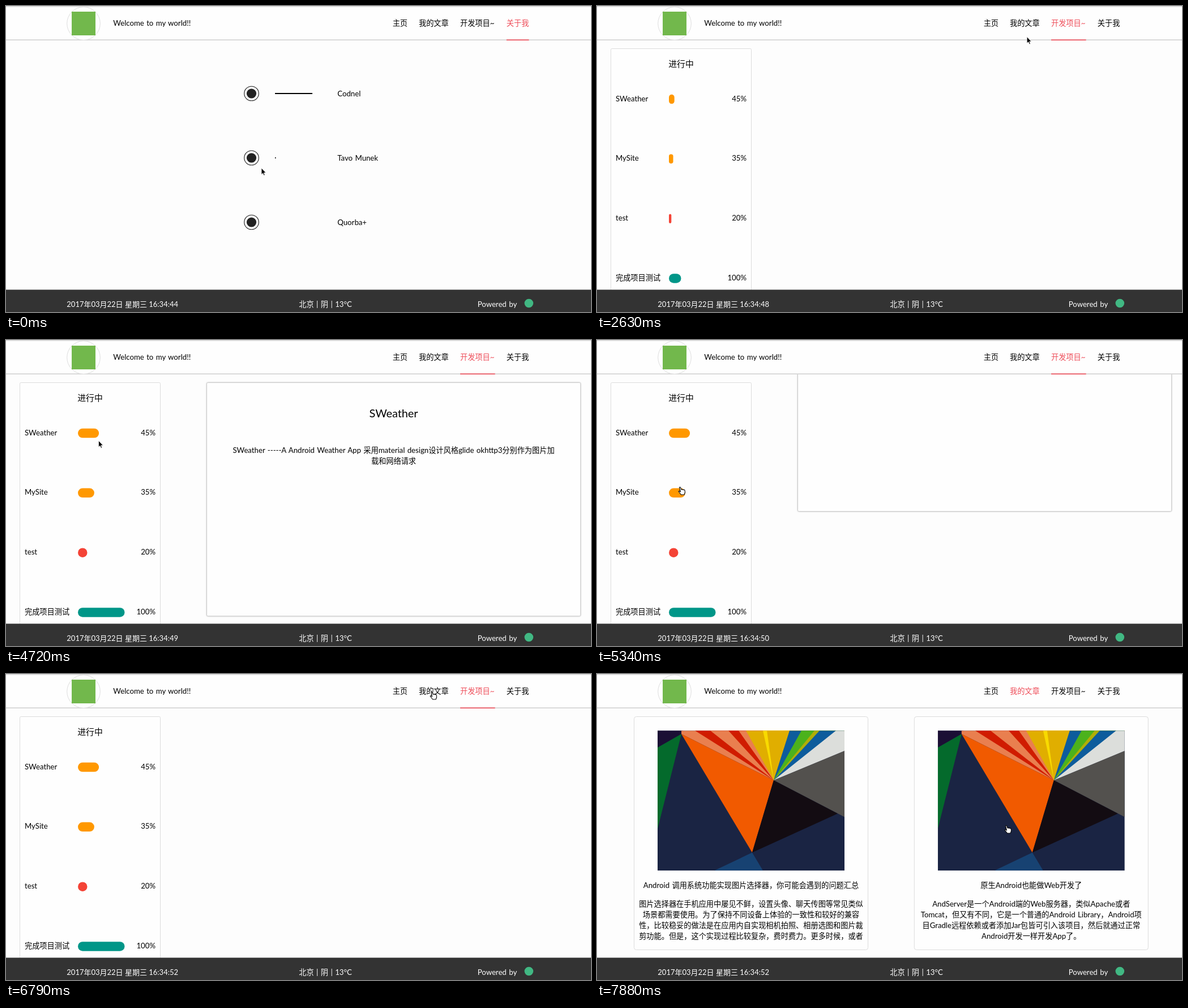
These frames come from a looping animation (1033 px wide and 542 px high, 8000 ms). An HTML page:

```html
<!DOCTYPE html>
<html lang="zh-CN">
<head>
<meta charset="utf-8">
<title>My world</title>
<style>
html, body { margin: 0; width: 100%; height: 100%; overflow: hidden; background: #fdfdfd; }
svg { display: block; width: 1033px; height: 542px; }
text { font: 13.2px Lato, "Noto Sans CJK SC", "Noto Sans CJK", sans-serif; word-spacing: .08em; fill: #000; }
.mid { text-anchor: middle; }
.end { text-anchor: end; }
.big { font-size: 19.8px; }
.head { font-size: 14.85px; }
.foot text { fill: #fff; }
#clock { font-size: 13px; word-spacing: 0; }
.card { fill: #fefefe; stroke: #dcdcdc; }
#detail rect { fill: #fefefe; stroke: #ccc; filter: drop-shadow(0 0 1px rgba(0,0,0,.25)); }
</style>
</head>
<body>
<svg viewBox="0 0 1033 542">
  <defs>
    <clipPath id="frame"><rect width="330" height="248"/></clipPath>
    <g id="art" clip-path="url(#frame)">
      <rect width="330" height="248" fill="#1a2443"/>
      <path d="M0 0H45L42 6 0 30z" fill="#1b0f35"/>
      <path d="M0 30L42 6 0 174z" fill="#046a2c"/>
      <g id="fan"></g>
      <path d="M42 6L205 88 167 216z" fill="#f15a00"/>
      <path d="M315 0H330V36L205 88z" fill="#dcdedb"/>
      <path d="M330 36V153L205 88z" fill="#53514e"/>
      <path d="M205 88L318 147 167 216z" fill="#130c12"/>
      <path d="M167 216L100 248H186z" fill="#174272"/>
    </g>
  </defs>
  <rect width="1033" height="542" fill="#fdfdfd"/>

  <g id="about"></g>

  <g id="projects">
    <rect class="card" x="24.5" y="75.5" width="248" height="460" rx="2"/>
    <text class="head mid" x="148.5" y="108">进行中</text>
    <g id="rows"></g>
    <g id="detail">
      <rect x="354.5" y="75.5" width="660" height="413.5" rx="2"/>
      <g id="weather">
        <text class="big mid" x="684.5" y="137">SWeather</text>
        <text class="mid" x="684.5" y="200">SWeather -----A Android Weather App 采用material design设计风格glide okhttp3分别作为图片加</text>
        <text class="mid" x="684.5" y="219">载和网络请求</text>
      </g>
      <g id="site">
        <text class="big mid" x="684.5" y="137">MySite</text>
        <text class="mid" x="684.5" y="200">原先的老项目重新开坑重构：推掉angular用vue.js重构</text>
      </g>
    </g>
  </g>

  <g id="articles"></g>

  <g>
    <rect width="1033" height="60" fill="#fefefe"/>
    <rect y=".2" width="1033" height="1.3" fill="#cfcfcf"/>
    <rect y="59.2" width="1033" height="1.8" fill="#d6d6d6"/>
    <circle cx="137" cy="31" r="29.3" fill="#fff" stroke="#ddd"/>
    <rect x="116" y="10" width="42" height="42" fill="#72b84c"/>
    <text x="189.3" y="35">Welcome to my world!!</text>
    <g id="nav"></g>
  </g>

  <g class="foot">
    <rect y="502.5" width="1033" height="40" fill="#333"/>
    <text id="clock" x="107.3" y="533"></text>
    <text class="mid" x="564" y="533">北京 | 阴 | 13°C</text>
    <text x="832.7" y="532.5">Powered by</text>
    <circle cx="923.3" cy="526.5" r="7.8" fill="#41b883"/>
  </g>

  <g id="cursor" stroke-linejoin="round">
    <path id="arrow" d="M0 0V11.6L2.6 9.2 4.4 13.2 6.2 12.4 4.5 8.5H8z" fill="#000" stroke="#fff" stroke-width=".8"/>
    <path id="hand" d="M-4.5-6q1.5-1.2 2.2.4L-1-2q1.4-1.2 2 .2q1.5-1 2 .4q1.6-.8 2 .6L5.5 3 4 7H-1.5L-5.8 1.5q0-1.6 1.6-.8L-2.6 2z" fill="#fff" stroke="#000" stroke-width="1.1"/>
  </g>
</svg>

<script>
const $ = id => document.getElementById(id);
const all = selector => document.querySelectorAll(selector);
const show = (id, on) => $(id).setAttribute('display', on ? 'inline' : 'none');
const set = (el, attrs) => Object.entries(attrs).forEach(([k, v]) => el.setAttribute(k, v));

const LOOP = 8000;
const RED = '#ee4c58', PINK = '#f6b0b5';

// Easing: progress of t from a to b, straight or smoothed
const ramp = (t, a, b) => Math.min(1, Math.max(0, (t - a) / (b - a)));
const smooth = p => p * p * (3 - 2 * p);
const inOut = p => p < .5 ? 4 * p ** 3 : 1 - 4 * (1 - p) ** 3;
// Rises to 1 after `on` and falls back after `off`
const pulse = (t, on, off, d) => smooth(ramp(t, on, on + d)) - smooth(ramp(t, off, off + d));

// Contact page
$('about').innerHTML = ['Codnel', 'Tavo Munek', 'Quorba+'].map((name, i) => {
  const y = 155 + i * 114;
  return `<g class="dot">
      <circle cx="433.5" cy="${y}" r="12.8" fill="none" stroke="#222" stroke-width="1.1"/>
      <circle cx="433.5" cy="${y}" r="8.6" fill="#222"/>
      <rect class="line" x="475" y="${y - 1}" height="2"/>
    </g>
    <text x="585.3" y="${y + 4.7}">${name}</text>`;
}).join('');

// Project list
const PROJECTS = [['SWeather', 45, '#ff9800'], ['MySite', 35, '#ff9800'],
  ['test', 20, '#f44336'], ['完成项目测试', 100, '#009688']];
$('rows').innerHTML = PROJECTS.map(([name, pct, color], i) => {
  const y = 165 + i * 105.8;
  return `<text x="33" y="${y + 3.6}">${name}</text>
    <rect class="bar" x="127" y="${y - 8.2}" height="16.5" fill="${color}"/>
    <text class="end" x="264" y="${y + 3.6}">${pct}%</text>`;
}).join('');

// Article cards: rays of the picture as [left end on top edge, colour]
const SALMON = '#e97f4f', CRIMSON = '#d01c00', YELLOW = '#e0ae00', BLUE = '#0d5c9c';
const RAYS = [[42, SALMON], [66, CRIMSON], [93, SALMON], [125, CRIMSON], [143, SALMON], [156, YELLOW],
  [186, '#f8da00'], [193, YELLOW], [233, BLUE], [254, '#4cb21c'], [277, '#b0ae08'], [286, BLUE]];
$('fan').innerHTML = RAYS.map(([x, color], i) =>
  `<path d="M${x} ${i ? 0 : 6}V0H330L205 88z" fill="${color}"/>`).join('');
const ARTICLES = [
  ['Android 调用系统功能实现图片选择器，你可能会遇到的问题汇总',
    '图片选择器在手机应用中屡见不鲜，设置头像、聊天传图等常见类似',
    '场景都需要使用。为了保持不同设备上体验的一致性和较好的兼容',
    '性，比较稳妥的做法是在应用内自实现相机拍照、相册选图和图片裁',
    '剪功能。但是，这个实现过程比较复杂，费时费力。更多时候，或者'],
  ['原生Android也能做Web开发了',
    'AndServer是一个Android端的Web服务器，类似Apache或者',
    'Tomcat，但又有不同，它是一个普通的Android Library，Android项',
    '目Gradle远程依赖或者添加Jar包皆可引入该项目，然后就通过正常',
    'Android开发一样开发App了。']];
$('articles').innerHTML = ARTICLES.map((rows, i) =>
  `<g transform="translate(${i * 494.8})">
    <rect class="card" x="65.5" y="75.5" width="413" height="413" rx="4"/>
    <use href="#art" x="107" y="100.3"/>
    ${rows.map((s, k) => `<text class="mid" x="272" y="${k ? 393 + k * 19 : 379}">${s}</text>`).join('')}
  </g>`).join('');

// Navigation: label, x, width, time chosen, time left
const NAV = [
  ['主页', 682.7, 26.4, Infinity, Infinity],
  ['我的文章', 729, 52.8, 7314, Infinity],
  ['开发项目~', 802, 61.6, 1410, 7314],
  ['关于我', 883.8, 39.6, -1000, 1410]];
$('nav').innerHTML = NAV.map(([name, x]) =>
  `<text x="${x}" y="35">${name}</text><rect y="59.4" height="1.6" fill="${RED}"/>`).join('');

// Pointer legs: start, end, target x, target y
const LEGS = [[0, 1270, 835, 40], [2250, 3500, 165, 168], [4520, 5200, 150, 267],
  [5900, 6790, 755, 38], [7100, 7470, 695, 162], [7470, 7880, 726, 275]];
const SECONDS = [640, 1430, 2090, 2605, 3235, 5190, 6250, 6790];

// Pages fold towards a line just past the right edge.
function page(t, id, enter, leave) {
  const scale = ramp(t, enter, enter + 270) - ramp(t, leave, leave + 435);
  show(id, scale > 0);
  set($(id), { transform: `translate(${1044 * (1 - scale)}) scale(${scale} 1)` });
}

function drawNav(t) {
  const labels = all('#nav text'), unders = all('#nav rect');
  NAV.forEach(([, x, w, on, off], i) => {
    const hover = Math.abs(t - on) < 400;
    const len = on < LOOP ? w * pulse(t, on, off + 100, 300) : 0;
    labels[i].style.fill = hover ? PINK : t > on && t < off ? RED : '#000';
    set(unders[i], { x: x + (w - len) / 2, width: len, opacity: hover ? .65 : 1 });
  });
}

function drawCursor(t) {
  let x = 451, y = 287, moving = false;
  for (const [a, b, tx, ty] of LEGS) {
    const p = inOut(ramp(t, a, b));
    x += (tx - x) * p;
    y += (ty - y) * p;
    moving ||= t >= a && t < b;
  }
  // The hand stays on after the last menu click.
  const hand = !moving || t > 6790;
  set($('cursor'), { transform: `translate(${x} ${y})` });
  show('hand', hand);
  show('arrow', !hand);
}

function draw(t) {
  page(t, 'about', -500, 1365);
  page(t, 'projects', 1800, 7060);
  page(t, 'articles', 7600, LOOP);

  const fade = 1 - ramp(t, 1270, 1630);
  all('.dot').forEach(d => set(d, { opacity: fade }));
  all('.line').forEach((l, i) => set(l, { width: 66 * fade * ramp(t, i * 490 - 500, i * 490 - 10) }));

  const grow = smooth(ramp(t, 2250, 3390));
  all('.bar').forEach((b, i) => {
    const width = grow * PROJECTS[i][1] * .825;
    set(b, { width, rx: Math.min(8.25, width / 2) });
  });

  const open = pulse(t, 3622, 4720, 400) + pulse(t, 5120, 6013, 400);
  set($('detail'), { transform: `translate(0 ${440 * (open - 1)})` });
  show('weather', t < 5120);
  show('site', t >= 5120);

  const second = 44 + SECONDS.filter(s => t >= s).length;
  $('clock').textContent = `2017年03月22日 星期三 16:34:${second}`;

  drawNav(t);
  drawCursor(t);
}

const start = performance.now();
function loop() {
  draw((performance.now() - start) % LOOP);
  requestAnimationFrame(loop);
}
loop();
</script>
</body>
</html>
```
